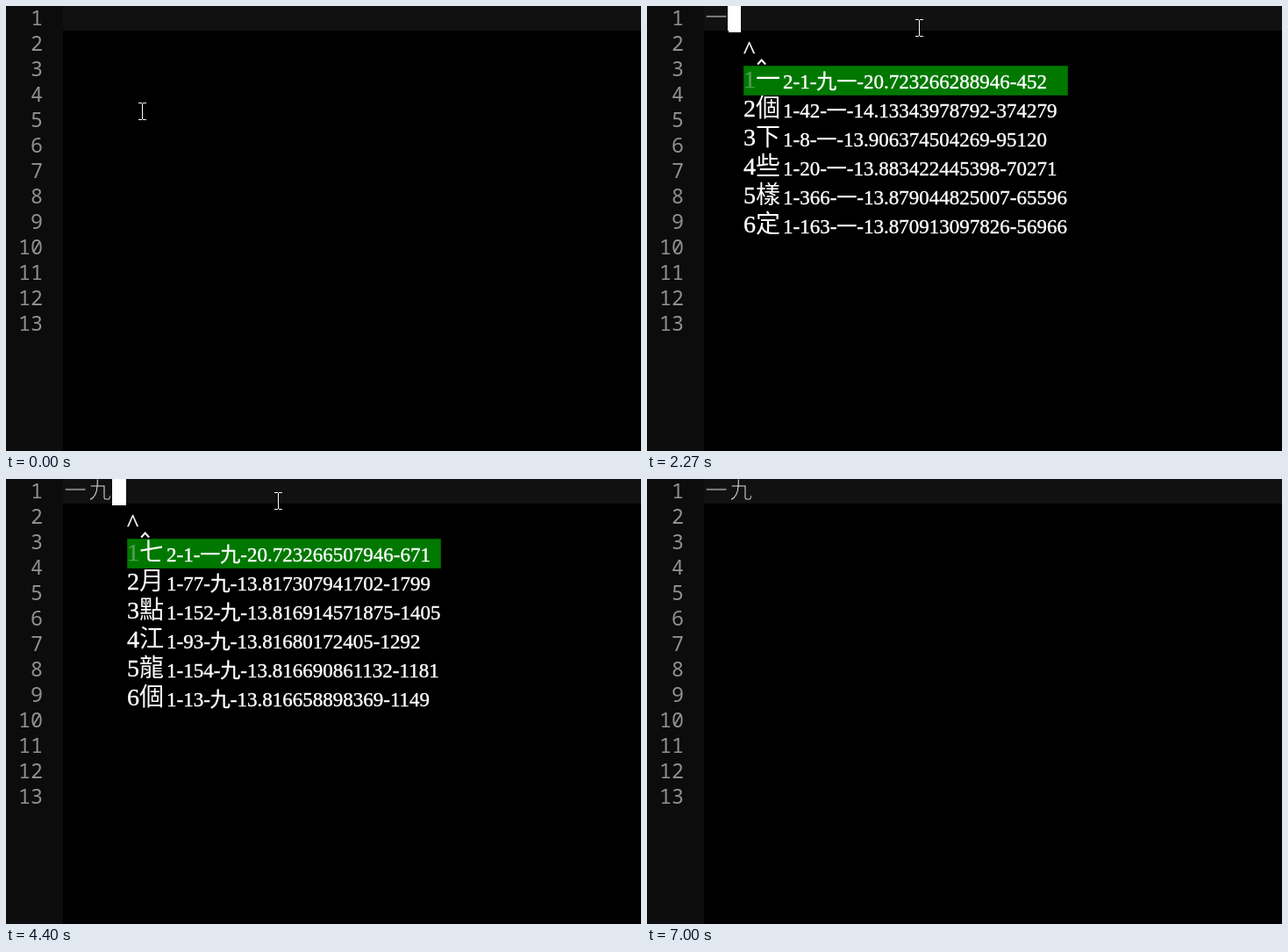
Animation, 724 px wide and 507 px high, one loop 7070 ms. Source, as an HTML page with a canvas:

```html
<!DOCTYPE html>
<html lang="zh-Hant">
<head>
<meta charset="utf-8">
<title>Input method demo</title>
<style>
html, body { margin: 0; width: 100%; height: 100%; overflow: hidden; background: #000; }
canvas { display: block; }
</style>
</head>
<body>
<canvas id="stage" width="724" height="507"></canvas>
<script>
const ctx = document.getElementById('stage').getContext('2d');
const LOOP = 7070, STEP = 1000 / 15, CELL = 14, ROW = 33;
const OPEN = 1730, CLOSE = 7000;
const SERIF = '"Liberation Serif", "Noto Sans CJK TC", "Noto Sans CJK", serif';
const MONO = '"Noto Sans Mono", "DejaVu Sans Mono", monospace';
const CJK = '"Noto Sans CJK TC", "Noto Sans CJK", sans-serif';
const BIG = '28px ' + SERIF, SMALL = '23px ' + SERIF;

// Typing script: start, committed text, preedit, candidates
const script = [
  [0, '', '', ''],
  [OPEN, '', 'q', '一 *ʔit|要 ʔews|於 ʔa|影 ʔraŋʔ|矣 ʔɯʔ|按 *ʔˤɑns'],
  [1870, '', 'qi', '一 *ʔit|因 ʔin|伊 ʔi|印 ʔins|益 *ʔik|嬰 *ʔeŋ'],
  [2000, '', 'qit', '一 *ʔit|壹 *ʔit|弌 *ʔit'],
  [2200, '一', '', ''],
  [2270, '一', '^', '一 2-1-九一-20.723266288946-452|個 1-42-一-14.13343978792-374279|' +
    '下 1-8-一-13.906374504269-95120|些 1-20-一-13.883422445398-70271|' +
    '樣 1-366-一-13.879044825007-65596|定 1-163-一-13.870913097826-56966'],
  [2670, '一', 'k', '九 kʉʔ|個 kals|見 kens|家 kra|高 kaw|今 krɯm'],
  [2730, '一', 'kg', '九 kʉʔ|久 *kʷɯʔ|救 kus|京 kraŋ|今 krɯm|基 kɯ'],
  [2870, '一', 'kgq', '九 kʉʔ|韭 *kʉʔ|奺 *kʷɯʔ|妏 >kʉˀ|奄 *kʷɯʔ'],
  [3470, '一九', '^', '七 2-1-一九-20.723266507946-671|月 1-77-九-13.817307941702-1799|' +
    '點 1-152-九-13.816914571875-1405|江 1-93-九-13.81680172405-1292|' +
    '龍 1-154-九-13.816690861132-1181|個 1-13-九-13.816658898369-1149'],
  [CLOSE, '一九', '', '']
];

// Pointer moves: start, duration, destination
const moves = [
  { start: 0, time: 400, x: 254, y: 54 },
  { start: 530, time: 140, x: 292, y: 47 },
  { start: 930, time: 200, x: 305, y: 26 },
  { start: 1270, time: 60, x: 318, y: 23 },
  { start: 1400, time: 130, x: 310, y: 25 },
  { start: 5410, time: 600, x: 358, y: 520 }
];

// Square wave that is on during its first half period
const blink = (t, start, half) => t >= start && Math.floor((t - start) / half) % 2 === 0;

function pointerAt(t) {
  let x = 155, y = 120;
  for (const move of moves) {
    const u = Math.min(1, Math.max(0, (t - move.start) / move.time));
    x += (move.x - x) * u;
    y += (move.y - y) * (1 - (1 - u) ** 1.8);
  }
  return [Math.round(x), Math.round(y)];
}

function rect(color, x, y, w, h) {
  ctx.fillStyle = color;
  ctx.fillRect(x, y, w, h);
}

// A positive weight thickens the glyphs; an edge colour like the ground thins them
function text(str, x, y, font, color = '#fff', weight = 0, edge = color) {
  ctx.font = font;
  ctx.fillStyle = color;
  ctx.fillText(str, x, y);
  if (!weight) return;
  ctx.strokeStyle = edge;
  ctx.lineWidth = weight;
  ctx.strokeText(str, x, y);
}

function drawEditor(committed) {
  rect('#000', 0, 0, 724, 507);
  rect('#0c0c0c', 0, 0, 65, 507);
  rect('#111', 65, 0, 659, 28);
  ctx.textAlign = 'right';
  for (let n = 1; n <= 13; n++) text(n, 42, 22 + 29 * (n - 1), '23.33px ' + MONO, '#909090');
  ctx.textAlign = 'left';
  [...committed].forEach((char, i) =>
    text(char, 66 + 2 * CELL * i, 22, '26px ' + CJK, '#e0e0e0', 1, '#111'));
}

function drawWindow(x, preedit, candidates) {
  text(preedit, x, 59, BIG, '#fff', 0.4);
  const caretX = x + ctx.measureText(preedit).width + 2;
  ctx.lineWidth = 2;
  ctx.beginPath();
  ctx.moveTo(caretX + 1, 66.5);
  ctx.lineTo(caretX + 5.5, 61.5);
  ctx.lineTo(caretX + 10, 66.5);
  ctx.stroke();

  const rows = candidates.split('|').map(row => row.split(' '));
  ctx.font = SMALL;
  const width = Math.round(46 + Math.max(...rows.map(([, note]) => ctx.measureText(note).width)));
  rect('#006000', x, 68, width, ROW + 1);
  rect('#007800', x + 1, 69, width - 2, ROW - 1);
  rows.forEach(([word, note], i) => {
    const y = 94 + ROW * i;
    text(i + 1, x, y - 1, BIG, i ? '#fff' : '#4fa04f', 0.4);
    text(word, x + CELL, y - 1, BIG);
    text(note, x + 45, y, SMALL, '#fff', 0.4);
  });
}

function drawPointer(x, y) {
  rect('#fff', x, y - 9, 1, 18);
  for (const end of [y - 10, y + 9]) {
    rect('#fff', x - 4, end, 4, 1);
    rect('#fff', x + 1, end, 4, 1);
  }
}

function draw(t) {
  const [, committed, preedit, candidates] = script.findLast(([start]) => start <= t);
  const composing = t >= OPEN && t < CLOSE;
  const x = 65 + 2 * CELL * committed.length;
  drawEditor(committed);
  if (blink(t, 1000, 613)) rect('#fff', Math.max(65, x - 1), 0, 1, 28);
  if (composing) {
    rect('#fff', x, 0, CELL, 30);
    // The second commit restarts the blink
    if (blink(t, committed.length < 2 ? OPEN : 3335, 533)) rect('#fff', x + CELL, 0, 2, 30);
  }
  if (preedit) drawWindow(x + 17, preedit, candidates);
  drawPointer(...pointerAt(Math.floor(t / STEP) * STEP));
}

const begin = performance.now();
function tick() {
  draw((performance.now() - begin) % LOOP);
  requestAnimationFrame(tick);
}
tick();
</script>
</body>
</html>
```
